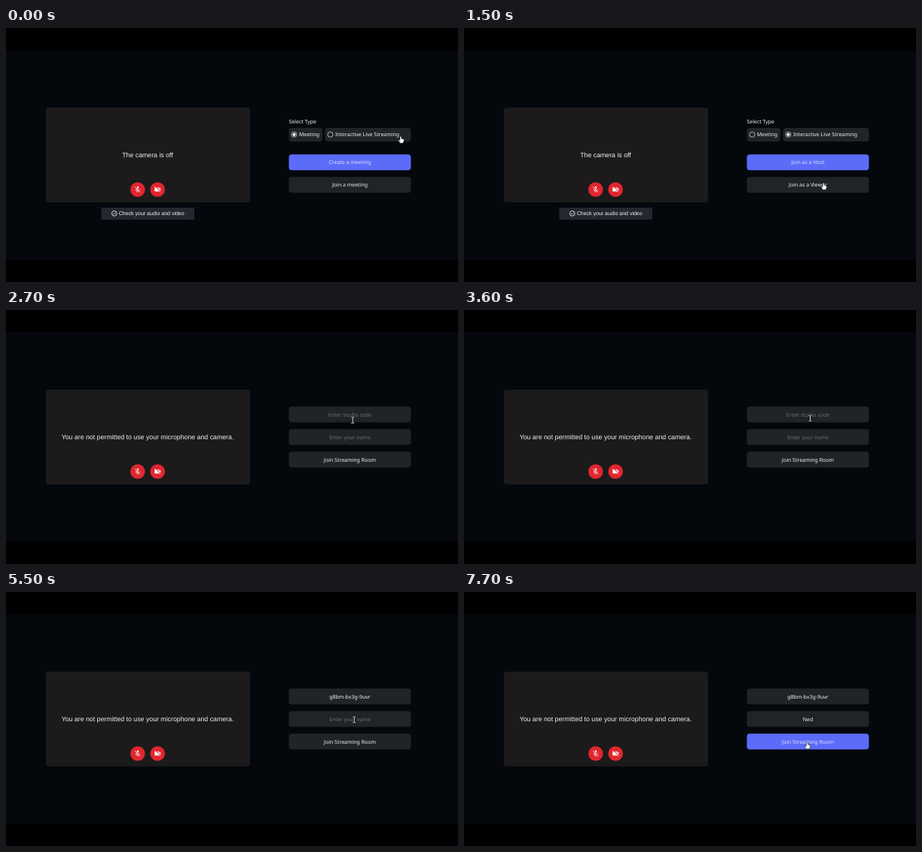
Write an HTML page that moves like this. It is 600 by 338 pixels and loops after 8 s.

```html
<!DOCTYPE html>
<html lang="en">
<head>
<meta charset="utf-8">
<title>Join a streaming room</title>
<style>
  html, body { margin: 0; height: 100%; overflow: hidden; background: #000; }
  svg { display: block; width: 100%; height: 100%; }
  text { font: 6.97px "Noto Sans", sans-serif; fill: #f4f5f6; text-rendering: geometricPrecision; }
  .sans { font-family: "Liberation Sans", Arial, sans-serif; }
  .big { font-size: 8.785px; }
  .small { font-size: 7.03px; }
  .middle { text-anchor: middle; }
  .hint { fill: #6b6f74; }
  .on-blue { fill: #dfe2ff; }
</style>
</head>
<body>
<svg id="stage" viewBox="0 0 600 338"></svg>
<script>
const LOOP = 8000, STEP = 100;
const DARK = '#202427', BLUE = '#5c6cf9';
const MID = 456.5;
const stage = document.getElementById('stage');
const measure = document.createElement('canvas').getContext('2d');
measure.font = '69.7px "Noto Sans", sans-serif';

// Pointer moves: start, end, from, to
const moves = [
  [400, 1400, [524, 144], [477.2, 206]],
  [2000, 2800, [477.2, 206], [459.5, 144]],
  [4000, 4700, [459.5, 144], [462.2, 170]],
  [6700, 7500, [462.2, 170], [455.4, 199.7]],
];
const caretOn = [[3000, 3600], [3800, 4400], [4900, 5500], [5600, 6900], [7500, 7700]];

const rect = (x, y, w, h, fill, r = 0) =>
  `<rect x="${x}" y="${y}" width="${w}" height="${h}" rx="${r}" fill="${fill}"/>`;
const text = (x, y, s, cls = '') => `<text x="${x}" y="${y}" class="${cls}">${s}</text>`;
const row = (y, s, cls = '', fill = DARK) =>
  rect(375.5, y, 162, 21, fill, 4) + text(MID, y + 13.1, s, 'middle ' + cls);

const icons = {
  mic: `<rect x="9" y="2.5" width="6" height="11.5" rx="3" fill="#fff"/>
    <path d="M6 11a6 6 0 0 0 12 0M12 17v4" fill="none" stroke="#fff" stroke-width="1.8"/>`,
  camera: `<path d="M4 6H16L17 7V10.5L21 6.5V17.5L17 13.5V17L16 18H4L3 17V7Z" fill="#fff"/>`,
};
const mutedButton = (x, icon) => `<circle cx="${x}" cy="215" r="9.8" fill="#e0262f"/>
  <g transform="translate(${x - 5.28} 209.7) scale(.44)">${icons[icon]}
    <path d="M5 2L22 19" stroke="#e0262f" stroke-width="2.4"/>
    <path d="M3.5 3.5L20.5 20.5" stroke="#fff" stroke-width="1.8"/></g>`;

const radio = (x, w, label, checked) => rect(x, 133, w, 18, DARK, 4) +
  `<circle cx="${x + 7}" cy="141.8" r="3.5" fill="none" stroke="#eee" stroke-width=".7"/>` +
  (checked ? `<circle cx="${x + 7}" cy="141.8" r="2.1" fill="#fff"/>` : '') +
  text(x + 13.4, 144.3, label);

function preview(message) {
  return rect(53, 106, 271, 126, '#1c1a1b', 4) +
    text(188, 172.1, message, 'sans big middle') +
    mutedButton(174.8, 'mic') + mutedButton(201.2, 'camera');
}

function lobby(t) {
  const live = t >= 100;
  return preview('The camera is off') +
    rect(126.5, 239, 123.5, 16, '#232830', 1) +
    `<g fill="none" stroke="#fff" stroke-width=".8"><circle cx="143.8" cy="246.8" r="3.4"/>
      <path d="M142.1 246.8l1.2 1.2 2.3-2.4"/></g>` +
    text(149.7, 249.2, 'Check your audio and video', 'sans small') +
    text(375.4, 126.8, 'Select Type') +
    radio(375.5, 44.5, 'Meeting', !live) +
    radio(423.5, 114, 'Interactive Live Streaming', live) +
    row(168.2, live ? 'Join as a Host' : 'Create a meeting', 'on-blue', BLUE) +
    row(198.2, live ? 'Join as a Viewer' : 'Join a meeting');
}

function joinForm(t) {
  const code = t < 3800 ? '' : 'g8bm-bx3g-9uvr';
  const name = 'Ned'.slice(0, t < 5600 ? 0 : t < 6100 ? 1 : t < 6300 ? 2 : 3);
  const ready = name.length > 2;
  const [value, y] = t < 4900 ? [code, 135] : [name, 165];
  const caretX = MID + measure.measureText(value).width / 20;
  return preview('You are not permitted to use your microphone and camera.') +
    row(128.6, code || 'Enter studio code', code ? '' : 'hint') +
    row(158.6, name || 'Enter your name', name ? '' : 'hint') +
    row(188.5, 'Join Streaming Room', ready ? 'on-blue' : '', ready ? BLUE : DARK) +
    (caretOn.some(([a, b]) => t >= a && t < b) ? rect(caretX, y, .6, 8, '#eee') : '');
}

const pointers = {
  hand: `<path d="M-1.1 1V5.6L-2.2 4.8Q-3.5 4.6 -3.2 5.7L-1 9.2H3.2L4.3 6.3V4.6Q4.2 3.7 3.2 3.7L1 3V1Q.8 0 0 0T-1.1 1Z"
    fill="#fff" stroke="#000" stroke-width=".6"/>`,
  arrow: `<path d="M0 0V8.4L2 6.7L3.3 9.5L4.6 8.9L3.4 6.2H6Z" fill="#fff" stroke="#000" stroke-width=".6"/>`,
  beam: ['#000" stroke-width="1.9', '#fff" stroke-width=".9'].map(s =>
    `<path d="M-1.9 -3.8H-.6L0 -3.3L.6 -3.8H1.9M0 -3.3V3.3M-1.9 3.8H-.6L0 3.3L.6 3.8H1.9" fill="none" stroke="${s}"/>`).join(''),
};

function pointer(t) {
  const [start, end, from, to] = moves.findLast(m => t >= m[0]) || moves[0];
  const k = Math.min(1, Math.max(0, (t - start) / (end - start)));
  const ease = k * k * (3 - 2 * k);
  const [x, y] = from.map((v, i) => v + (to[i] - v) * ease);
  const over = (top, bottom) => y >= top && y <= bottom;
  let kind = 'arrow';
  if (t < 2000) {
    if (over(133, 151) || over(168, 189) || over(198, 219)) kind = 'hand';
  } else if (over(188.5, 209.5)) kind = 'hand';
  else if (over(128.6, 149.6) || over(158.6, 179.6)) kind = 'beam';
  return `<g transform="translate(${x} ${y})">${pointers[kind]}</g>`;
}

let shown = -1;
function draw() {
  const t = Math.floor(performance.now() % LOOP / STEP) * STEP;
  if (t !== shown) {
    shown = t;
    stage.innerHTML = rect(0, 29.5, 600, 279, '#04080c') +
      (t < 2000 ? lobby(t) : joinForm(t)) + pointer(t);
  }
  requestAnimationFrame(draw);
}
draw();
</script>
</body>
</html>
```
